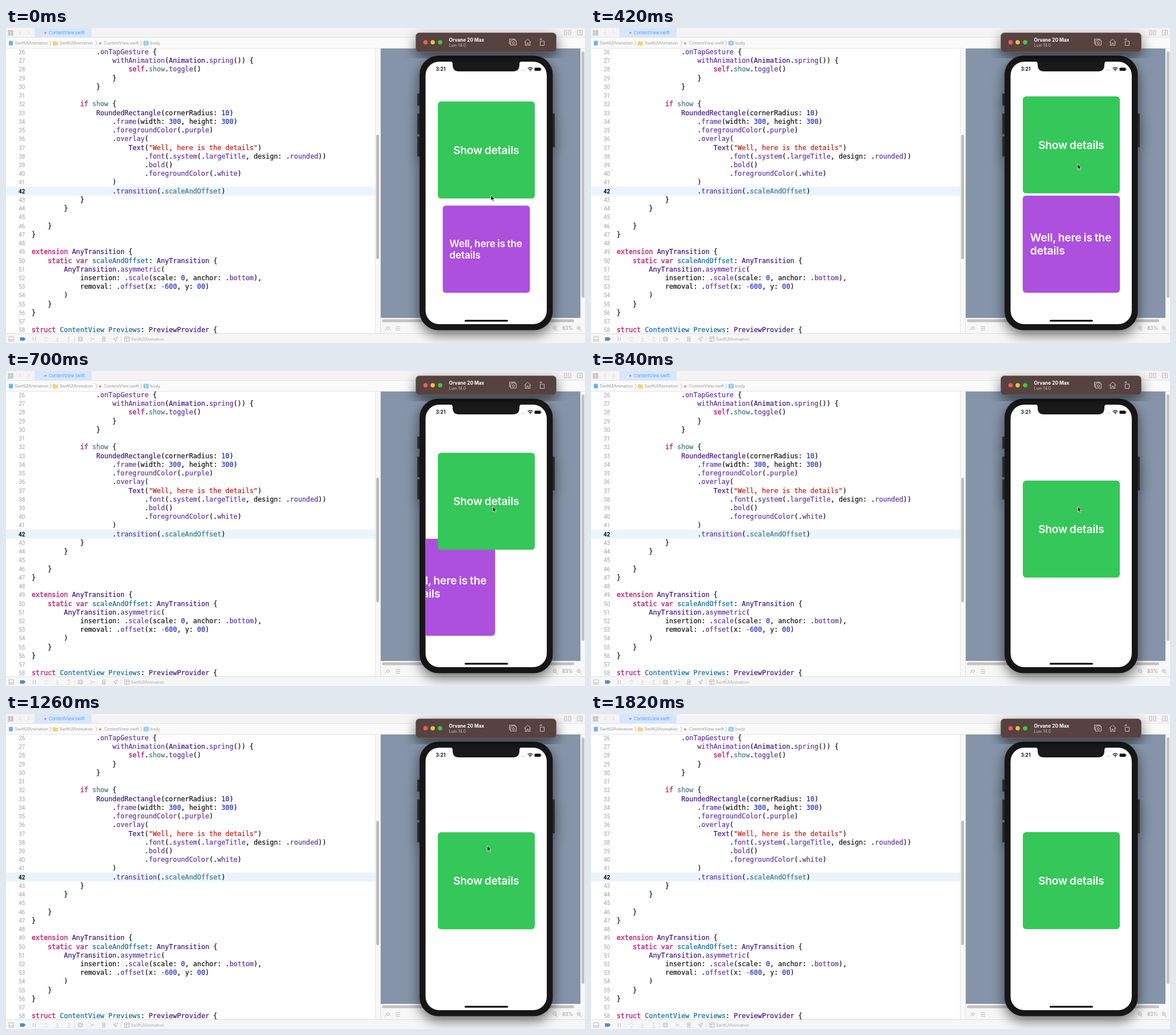
These frames come from a looping animation (1015x552 px, 1.89 s). An HTML page:

```html
<!DOCTYPE html>
<html lang="en">
<head>
<meta charset="utf-8">
<title>Transition preview</title>
<style>
html, body { margin: 0; width: 100%; height: 100%; overflow: hidden; background: #fff; }
svg { display: block; width: 1015px; height: 552px; font-family: Inter, sans-serif; }
#code text { font: 11.75px "DejaVu Sans Mono", monospace; white-space: pre; color: #111; }
#code text, #code tspan { fill: currentColor; stroke: currentColor; stroke-width: .22px; }
#code .line { font: 10px Roboto, sans-serif; color: #a2a2a2; stroke: none; text-anchor: end; }
#code .current { font-weight: 700; color: #111; }
#code .keyword { color: #b83280; stroke-width: .5px; }
.string { color: #c41a16; }
.number { color: #1c2fcf; }
.declared { color: #0f68a0; }
.own { color: #427a84; }
.type { color: #3d1480; }
.member { color: #6335a0; }
.small { font-size: 7.2px; fill: #999; }
.icons { fill: none; stroke: #b4b4b4; stroke-width: .9; }
.title { font-weight: 600; font-size: 19.3px; letter-spacing: -.22px; word-spacing: -.8px; fill: #fff; }
</style>
</head>
<body>
<svg viewBox="0 0 1015 552">
  <defs>
    <clipPath id="screen"><rect x="735.5" y="59" width="212.5" height="460" rx="24"/></clipPath>
    <filter id="shadow" x="-30%" y="-30%" width="160%" height="160%">
      <feDropShadow dx="0" dy="8" stdDeviation="11" flood-color="#000" flood-opacity=".58"/>
    </filter>
  </defs>

  <rect width="1015" height="552" fill="#fff"/>
  <rect y="278" width="647" height="15.5" fill="#e9f4fd"/>
  <g id="code"></g>

  <!-- Editor chrome -->
  <rect width="1015" height="17" fill="#f4f4f4"/>
  <rect x="50" width="100" height="17" fill="#d5e7fb"/>
  <rect y="17" width="1015" height="19" fill="#fafafa"/>
  <path d="M0 16.5H1015M0 35.5H1015" stroke="#e3e3e3"/>
  <circle cx="69" cy="8.5" r="1.8" fill="#f08070"/>
  <text x="75" y="11" style="font-size:7.4px;fill:#5d9bec">ContentView.swift</text>
  <g class="icons">
    <path d="M4 4.500h3v3h-3zM9 4.500h3v3h-3zM4 9.500h3v3h-3zM9 9.500h3v3h-3z" stroke="#999"/>
    <path d="M26 5l-3 3 3 3M38 5l3 3-3 3" stroke="#d0d0d0"/>
    <path d="M979 4h4v8h-4zM986 4h4v8h-4zM1001.500 4h9v8h-9zM1007 4v8M1004 8h3"/>
    <path d="M77 22l2.500 4.500-2.500 4.500M157 22l2.500 4.500-2.500 4.500M235.500 22l2.500 4.500-2.500 4.500"/>
  </g>
  <rect x="5" y="22.500" width="7" height="8" rx="1" fill="#6eb0ee"/>
  <path d="M82 23h4l1 1h4v6.500h-9z" fill="#f2d080"/>
  <circle cx="165" cy="27" r="2" fill="#ef8575"/>
  <rect x="241" y="22.500" width="9" height="8" rx="1.500" fill="#82c2f2"/>
  <path d="M243 25h5M243 28h5" stroke="#fff"/>
  <g class="small">
    <text x="15.500" y="29">SwiftUIAnimation</text>
    <text x="94" y="29">SwiftUIAnimation</text>
    <text x="172" y="29">ContentView.swift</text>
    <text x="253" y="29">body</text>
  </g>

  <!-- Preview canvas -->
  <rect x="647" y="36" width="368" height="499" fill="#f8f8f8"/>
  <path d="M647.500 36V535M656.500 36V535" stroke="#e2e2e2"/>
  <rect x="649" y="187" width="5" height="218" rx="2.500" fill="#bdbdbd"/>
  <rect x="657" y="36" width="350" height="472" fill="#8594a8"/>
  <rect x="1009" y="41" width="5" height="432" rx="2.500" fill="#c2c2c2"/>
  <rect x="659" y="510.500" width="337" height="5" rx="2.500" fill="#c2c2c2"/>
  <rect x="657" y="517" width="358" height="18" fill="#f7f7f7"/>
  <g class="icons">
    <path d="M664 530l3-3M666 525l4 4 1-2 2-1-3-3-1 2zM683 523.500h8M683 526.500h8M683 529.500h8"/>
    <circle cx="962" cy="525.500" r="3"/><path d="M964 528l3 3M960.500 525.500h3"/>
    <circle cx="1004" cy="525.500" r="3"/><path d="M1006 528l3 3M1002.500 525.500h3M1004 524v3"/>
  </g>
  <text x="975" y="529" style="font-size:8.500px;fill:#999">83%</text>

  <!-- Debug bar -->
  <rect y="535" width="1015" height="17" fill="#f6f6f6"/>
  <path d="M0 535.500H1015" stroke="#dedede"/>
  <path d="M24.500 542h7l3 3-3 3h-7z" fill="#5c88ba"/>
  <g class="icons">
    <path d="M5 541h8v8h-8zM5 546.500h8M47.500 541.500v7M51.500 541.500v7"/>
    <path d="M67 545a3.500 3 0 0 1 7 0M68 548h5M90 541v6m-2-2 2 2 2-2M87 549h6M110 547v-6m-2 2 2-2 2 2M107 549h6" stroke="#d4d4d4"/>
    <path d="M120.500 540v10M201.500 540v10" stroke="#ddd"/>
    <path d="M128 541.500h-1v7h1M133 541.500h1v7h-1M129 541.500h3v7h-3zM148 542.500l3 2.500-3 3M151 545h4M169 541.500h5v3h-5zM169 546h5v3h-5zM188 545l8-4-4 8-.500-3.500zM208 541h8v8h-8zM208 543.500h8M211 543.500v5.500"/>
  </g>
  <text class="small" x="219" y="547.700" style="fill:#aaa">SwiftUIAnimation</text>

  <!-- Device -->
  <g filter="url(#shadow)">
    <path d="M721 115h5v21h-5zM721 150h5v36h-5zM721 190h5v35h-5zM957 150h5v59h-5z" fill="#292929"/>
    <rect x="725" y="48.500" width="233.500" height="481" rx="33" fill="#191919"/>
  </g>
  <rect x="735.500" y="59" width="212.500" height="460" rx="24" fill="#fff"/>
  <g clip-path="url(#screen)">
    <g id="details">
      <rect x="757" y="294" width="170" height="170" rx="5.700" fill="#ad50dd"/>
      <text class="title" x="770" y="374.500">Well, here is the</text>
      <text class="title" x="770" y="397.500">details</text>
    </g>
    <g id="card">
      <rect x="757" width="170" height="170" rx="5.700" fill="#35c759"/>
      <text class="title" x="841.700" y="92" text-anchor="middle">Show details</text>
    </g>
  </g>
  <path d="M778 58.500q5 0 5 5v1q0 11.500 11 11.500h95q11 0 11-11.500v-1q0-5 5-5z" fill="#191919"/>
  <text x="753.500" y="75" style="font-size:8.500px;font-weight:600">3:21</text>
  <path d="M903 74h8" stroke="#999" stroke-dasharray="1.200 1.200"/>
  <g fill="none" stroke="#111" stroke-width="1.300">
    <path d="M914.700 71q4.300-3.600 8.600 0M916.500 73q2.500-2 5 0"/>
    <circle cx="919" cy="74.500" r=".4"/>
  </g>
  <rect x="926.500" y="69.500" width="11" height="5.500" rx="1.600" fill="#111"/>
  <path d="M938.700 71.300v2" stroke="#777"/>
  <rect x="804" y="511.500" width="76" height="3" rx="1.500" fill="#050505"/>

  <rect x="718.500" y="8.500" width="246" height="33.500" rx="6" fill="#574340" stroke="#70605d" stroke-width=".7" filter="url(#shadow)"/>
  <circle cx="735.500" cy="25" r="3.800" fill="#f35d56"/>
  <circle cx="748" cy="25" r="3.800" fill="#f6bd3b"/>
  <circle cx="761" cy="25" r="3.800" fill="#43c645"/>
  <text x="776.500" y="23.500" style="font-size:8.300px;font-weight:700;fill:#fff">Orvane 20 Max</text>
  <text x="776.500" y="32.500" style="font-size:7px;fill:#c9bfbd">Lum 14.0</text>
  <g fill="none" stroke="#d2c8c6">
    <path d="M884.500 27.500h-2v-8h10v1.500M884.500 22h2.500l1-1h3l1 1h2.500v8h-10z"/><circle cx="889.500" cy="26" r="2"/>
    <path d="M908.500 25l6-5.500 6 5.500M910.500 24v6.500h2.700v-4h2.600v4h2.700V24"/>
    <path d="M936.500 23h7v7.500h-7zM935 21q1-2 4-1.500m-1.500-1.500 1.500 1.500-1.500 1.500"/>
  </g>
  <path id="cursor" d="M0 0V9.500L2.200 7.500 3.700 11 5.300 10.300 3.800 7H6.700Z" fill="#111" stroke="#fff" stroke-width=".8"/>
</svg>

<script>
const source = `                .onTapGesture {
                    withAnimation(Animation.spring()) {
                        self.show.toggle()
                    }
                }

            if show {
                RoundedRectangle(cornerRadius: 10)
                    .frame(width: 300, height: 300)
                    .foregroundColor(.purple)
                    .overlay(
                        Text("Well, here is the details")
                            .font(.system(.largeTitle, design: .rounded))
                            .bold()
                            .foregroundColor(.white)
                    )
                    .transition(.scaleAndOffset)
            }
        }

    }
}

extension AnyTransition {
    static var scaleAndOffset: AnyTransition {
        AnyTransition.asymmetric(
            insertion: .scale(scale: 0, anchor: .bottom),
            removal: .offset(x: -600, y: 00)
        )
    }
}

struct ContentView_Previews: PreviewProvider {`;

const token = new RegExp([
  '(?<string>"[^"]*")',
  '(?<declared>(?<=var |struct )\\w+)',
  '(?<keyword>\\b(?:if|self|extension|static|var|struct)\\b)',
  '(?<number>-?\\b\\d+)',
  '(?<label>\\b\\w+(?=:))',
  '(?<own>\\b(?:show|scaleAndOffset)\\b)',
  '(?<type>\\b[A-Z]\\w*)',
  '(?<member>\\b[a-z]\\w*)'
].join('|'), 'g');

const highlight = line => line.replace(token, (...args) => {
  const kind = Object.entries(args.at(-1)).find(([, value]) => value)[0];
  return `<tspan class="${kind}">${args[0]}</tspan>`;
});

const $ = id => document.getElementById(id);
$('code').innerHTML = source.split('\n').map((line, i) => {
  const number = 26 + i, y = 46 + i * 15.23;
  return `<text class="line${number === 42 ? ' current' : ''}" x="33.5" y="${y}">${number}</text>
    <text x="45" y="${y}">${highlight(line)}</text>`;
}).join('');

const LOOP = 1890, STEP = 70;

// Damped spring from 0 to 1: response 0.52 s, damping fraction 0.825.
function spring(ms) {
  if (ms <= 0) return 0;
  const t = ms / 1000, omega = 2 * Math.PI / 0.52, zeta = 0.825;
  const root = Math.sqrt(1 - zeta * zeta), angle = omega * root * t;
  return 1 - Math.exp(-zeta * omega * t) * (Math.cos(angle) + zeta / root * Math.sin(angle));
}

const cursorPath = [[0, 850, 293], [210, 852.7, 239], [630, 853.3, 237.5], [1120, 853.3, 237.5], [1260, 843.7, 231], [1400, 842, 230], [LOOP, 842, 230]];

function cursorAt(time) {
  const i = cursorPath.findIndex(point => point[0] > time);
  const [t0, x0, y0] = cursorPath[i - 1], [t1, x1, y1] = cursorPath[i];
  const k = (time - t0) / (t1 - t0);
  return [x0 + (x1 - x0) * k, y0 + (y1 - y0) * k];
}

function draw(now) {
  const time = Math.floor(now % LOOP / STEP) * STEP;
  const inserted = spring(time + 254);
  const slide = -340 * spring(time - 634);
  const cardY = 207 - 87 * (inserted - spring(time - 621));

  $('card').setAttribute('transform', `translate(0 ${cardY})`);
  $('details').setAttribute('transform', `translate(${842 + slide} 464) scale(${inserted}) translate(-842 -464)`);
  $('details').style.display = time < 1100 ? '' : 'none';
  $('cursor').setAttribute('transform', `translate(${cursorAt(time)})`);
  $('cursor').style.display = time < 1750 ? '' : 'none';
  requestAnimationFrame(() => draw(performance.now()));
}
draw(0);
</script>
</body>
</html>
```
